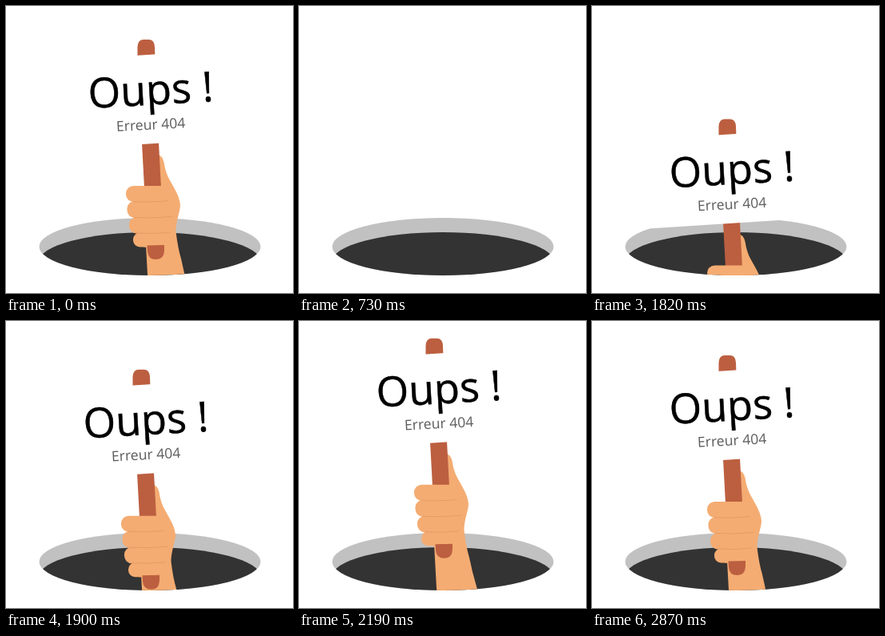
Animation, 359 px wide and 359 px high, one loop 2960 ms. Source, as an HTML page:

```html
<!DOCTYPE html>
<html lang="fr">
<head>
<meta charset="utf-8">
<title>Erreur 404</title>
<style>
  html, body { margin: 0; width: 100%; height: 100%; overflow: hidden; background: #fff; }
  svg { display: block; width: 100%; height: 100%; }
  text { font-family: "Open Sans", "Noto Sans", sans-serif; }
  .wood { fill: #bc5f40; }
  .skin { fill: #f4ac72; }
  .crease { fill: none; stroke: #e59d66; stroke-width: 1; stroke-linecap: round; }
</style>
</head>
<body>
<svg viewBox="0 0 359 359">
  <defs>
    <clipPath id="rim"><ellipse cx="180" cy="301" rx="138.5" ry="36"/></clipPath>
    <clipPath id="above"><rect width="359" height="345"/></clipPath>
    <clipPath id="inside"><path d="M0 0H359V301H318.5A138.5 36 0 0 1 41.5 301H0Z"/></clipPath>
  </defs>

  <g id="hole" clip-path="url(#rim)">
    <rect y="260" width="359" height="90" fill="#c1c1c1"/>
    <ellipse cx="180" cy="319.5" rx="138.5" ry="36.5" fill="#333"/>
  </g>

  <g clip-path="url(#inside)">
    <g class="move">
      <path class="skin" d="M184 187Q189.500 188 191.500 196C194 212 198 217 204 228Q211.500 241 212 250C212 258 206.500 270 206.500 283Q209 304 213 317L217 335L225 364H172.500L169 300L160 228H180Z"/>
      <path class="wood" d="M164 172.500L185 171.500L188 228H167Z"/>
      <g class="skin">
        <rect x="144" y="226" width="58" height="20" rx="9.500"/>
        <rect x="145.500" y="245" width="58" height="21" rx="9.500"/>
        <rect x="148" y="265" width="54" height="20.500" rx="9.500"/>
        <rect x="153" y="284.500" width="45" height="18" rx="8.500"/>
        <path d="M160 228H203L206 283L196 302.500H166Z"/>
      </g>
      <g class="crease">
        <path d="M153 245.500Q176 247 197 244.500"/>
        <path d="M154 265.500Q178 267 202 264.500"/>
        <path d="M157 285Q178 286.500 200 284"/>
      </g>
      <path class="wood" d="M170.500 300.500L192 300V307Q191.500 318 182 318Q171.500 318 171 308Z"/>
    </g>
  </g>

  <g clip-path="url(#above)">
    <g class="move">
      <path class="wood" d="M158.500 66V52Q159 43 166 43H172.500Q179.500 43 180 52L180.500 66Z"/>
      <path fill="#fff" d="M62 69L281 55L288 166L70 180Z"/>
      <text transform="translate(97.800 129) rotate(-3.300)" font-size="52" fill="#000" stroke="#000" stroke-width=".5">Oups !</text>
      <text transform="translate(132.300 157.800) rotate(-3)" font-size="17.600" fill="#5c5c5c">Erreur 404</text>
    </g>
  </g>
</svg>
<script>
  const LOOP = 2960, SHAKE_END = 540, HOLE_IN = 730, RISE = 1700;
  const hole = document.getElementById('hole');
  const movers = document.querySelectorAll('.move');

  const hold = (t, from, step) => from + Math.floor((t - from) / step) * step;

  function backOut(p) {
    const u = Math.min(p, 1) - 1, c = 1.70158;
    return 1 + (c + 1) * u ** 3 + c * u * u;
  }

  function shake(t) {
    const s = t < 30 ? 0 : hold(t, 30, 46);
    return [6 * Math.cos(2 * Math.PI * s / 267), -1 - s / 490];
  }

  function rise(t) {
    if (t < 1760) return [0, 260];
    return [0, 300 * (1 - backOut((hold(t, 1760, 33.05) - 1657) / 729))];
  }

  function draw(t) {
    const shown = t < SHAKE_END || t >= RISE;
    hole.style.display = shown || t >= HOLE_IN ? '' : 'none';
    const [x, y] = t < SHAKE_END ? shake(t) : rise(t);
    for (const m of movers) {
      m.style.display = shown ? '' : 'none';
      m.setAttribute('transform', `translate(${x.toFixed(2)} ${y.toFixed(2)})`);
    }
  }

  const start = performance.now();
  function tick() {
    draw((performance.now() - start) % LOOP);
    requestAnimationFrame(tick);
  }
  tick();
</script>
</body>
</html>
```
